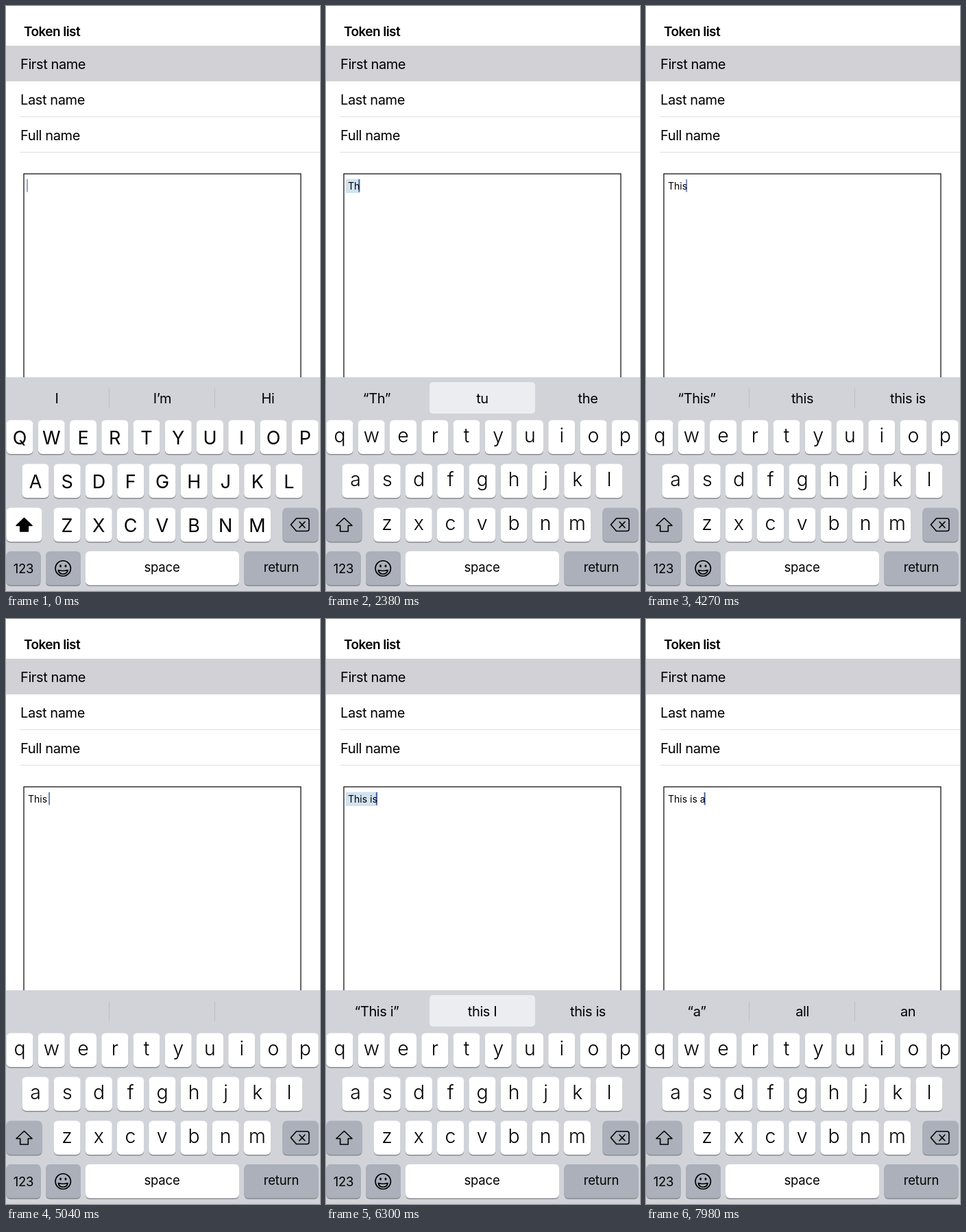
Recreate the animation shown at these times as an HTML page. Size 458 px wide and 854 px high, loop 8000 ms.

```html
<!DOCTYPE html>
<html lang="en">
<head>
<meta charset="utf-8">
<title>Token list</title>
<style>
html, body { margin: 0; width: 100%; height: 100%; overflow: hidden; background: #fff; }
svg { display: block; width: 458px; height: 854px; font-family: Inter, Roboto, "Liberation Sans", sans-serif; }
text { white-space: pre; }
.ui { font-size: 20px; letter-spacing: -.02em; }
.mid { text-anchor: middle; }
.small { font-size: 18.5px; letter-spacing: -.01em; }
.upper { font-size: 27px; }
.lower { font-size: 28.5px; font-weight: 300; }
</style>
</head>
<body>
<svg id="stage" viewBox="0 0 458 854">
  <defs>
    <linearGradient id="leaving">
      <stop id="leaveLeft" offset=".78"/>
      <stop id="leaveRight" offset=".9"/>
    </linearGradient>
    <filter id="soft" x="-30%" y="-20%" width="160%" height="140%">
      <feDropShadow dx="0" dy="1" stdDeviation="3" flood-color="#000" flood-opacity=".3"/>
    </filter>
  </defs>
</svg>
<script>
const LOOP = 8000;
const GRAY = '#abb0bb';
const ROWS = [['qwertyuiop', .5, 604.5], ['asdfghjkl', 23.5, 668.5], ['zxcvbnm', 69.5, 732.5]];
const PITCH = 46.25, KEY_W = 39, KEY_H = 49.5;

// [time, text in the box]
const TYPED = [[-660, ''], [1680, 'T'], [1960, 'Th'], [3010, 'Thi'], [3640, 'This'], [4430, 'This '],
  [5090, 'This i'], [6230, 'This is'], [6800, 'This is '], [7700, 'This is a']];

// [time, suggestions, correction pending]
const HINTS = [
  [-500, ['I', 'I’m', 'Hi']],
  [1780, ['“T”', 'the', 'this']],
  [2220, ['“Th”', 'tu', 'the'], true],
  [3140, ['“Thi”', 'tho', 'this'], true],
  [3860, ['“This”', 'this', 'this is']],
  [4480, ['', '', '']],
  [5300, ['“This i”', 'this I', 'this is'], true],
  [6400, ['“This is”', 'this is', 'this is a']],
  [6820, ['the', 'a', 'what']],
  [7790, ['“a”', 'all', 'an']]];

// [down, up, key]
const PRESSES = [[1530, 1680, 't'], [1815, 1960, 'h'], [2870, 3010, 'i'], [3500, 3640, 's'], [4300, 4570, ' '],
  [5045, 5095, 'i'], [6090, 6230, 's'], [6720, 6950, ' '], [7550, 7700, 'a']];

const svg = document.getElementById('stage');
const byId = id => document.getElementById(id);

function add(tag, attrs, parent = svg, content = '') {
  const el = document.createElementNS('http://www.w3.org/2000/svg', tag);
  for (const name in attrs) el.setAttribute(name, attrs[name]);
  el.textContent = content;
  parent.append(el);
  return el;
}
const set = (el, attrs) => { for (const name in attrs) el.setAttribute(name, attrs[name]); };
const show = (el, on) => el.setAttribute('visibility', on ? 'visible' : 'hidden');
const clamp = v => Math.max(0, Math.min(1, v));
const rect = (x, y, width, height, fill, rx = 0) => add('rect', { x, y, width, height, fill, rx });
const label = (x, y, cls, content) => add('text', { x, y, class: cls }, svg, content);

function key(x, y, width, fill = '#fff') {
  rect(x, y + 1.5, width, KEY_H, '#898b90', 6);
  return rect(x, y, width, KEY_H, fill, 6);
}
const line = (d, extra) => add('path', { d, fill: 'none', stroke: '#000', 'stroke-width': 1.6,
  'stroke-linejoin': 'round', 'stroke-linecap': 'round', ...extra });

// Token list
set(label(26, 44, 'ui', 'Token list'), { 'font-weight': 600, style: 'font-size:19px;letter-spacing:-.03em' });
rect(0, 58, 458, 52, '#d1d1d6');
['First name', 'Last name', 'Full name'].forEach((name, i) => {
  label(21, 92 + 52 * i, 'ui', name);
  if (i) rect(21, 109 + 52 * i, 437, 1, '#dedee0');
});

// Text box
add('rect', { x: 26, y: 245, width: 404, height: 320, fill: '#fff', stroke: '#000', 'stroke-width': 1.2 });
const mark = rect(28.5, 252.5, 0, 20.5, '#d2e2ef');
const cursor = rect(30, 253, 2, 18.5, '#4660a8');
const typed = label(32, 267.5, '', '');
typed.style.fontSize = '14px';

// Suggestion bar
rect(0, 542, 458, 312, '#d1d3d9');
const dividers = [150, 304].map(x => rect(x, 558, 1, 29, '#bcbec4'));
const chosen = rect(151, 549, 154, 46, '#ebedf1', 5);
const slots = [74, 228, 382];
const oldHints = slots.map(x => label(x, 580, 'ui mid', ''));
const newHints = slots.map(x => label(x, 580, 'ui mid', ''));
oldHints.forEach(el => el.setAttribute('fill', 'url(#leaving)'));

// Keyboard
const keys = {};
const letters = [];
ROWS.forEach(([chars, left, y]) => [...chars].forEach((char, i) => {
  const x = left + PITCH * i;
  key(x, y, KEY_W);
  keys[char] = { cx: x + KEY_W / 2, y };
  letters.push({ el: label(x + KEY_W / 2, y, 'mid', ''), char, y });
}));
const shiftKey = key(.5, 732.5, 52);
const shiftIcon = line('M26.5 747.5 L38 758.5 H32.3 V767 H20.7 V758.5 H15 Z');
key(403.5, 732.5, 52, GRAY);
line('M423.5 748 H439 Q442 748 442 751 V763.5 Q442 766.5 439 766.5 H423.5 L415.5 757.2 Z M428 753 l8 8.5 m0 -8.5 l-8 8.5');
key(.5, 796, 50, GRAY);
key(58, 796, 51, GRAY);
const spaceKey = key(116, 796, 224);
key(347.5, 796, 108, GRAY);
label(25.5, 828, 'mid small', '123');
label(227.5, 826, 'mid small', 'space');
label(401.5, 826, 'mid small', 'return');
line('M72 821 a11.2 11.2 0 1 0 22.4 0 a11.2 11.2 0 1 0 -22.4 0 M76.2 823.5 Q83.2 825.5 90.2 823.5 Q89 829.2 83.2 829.2 Q77.4 829.2 76.2 823.5 Z');
[79.5, 87].forEach(cx => add('ellipse', { cx, cy: 817.5, rx: 1.4, ry: 2 }));

// Enlarged key, drawn around the top centre of the pressed one
const popup = add('g', {});
add('path', { fill: '#fff', filter: 'url(#soft)',
  d: 'M-23 -76.5 H23 Q35 -76.5 35 -64.5 V-24 C35 -8 19.5 -9 19.5 8 V43.5 Q19.5 49.5 13.5 49.5 H-13.5 Q-19.5 49.5 -19.5 43.5 V8 C-19.5 -9 -35 -8 -35 -24 V-64.5 Q-35 -76.5 -23 -76.5 Z' }, popup);
const popupLetter = add('text', { y: -28, class: 'mid', 'font-size': 41, 'font-weight': 300 }, popup);

// Hold, fade out, rest, fade in
function cursorAlpha(age) {
  const a = age % 1150;
  if (a < 560) return 1;
  if (a < 800) return 1 - (a - 560) / 240;
  return clamp((a - 940) / 210);
}
const indexAt = (list, t) => list.findLastIndex(item => item[0] <= t);

function draw(t) {
  const upper = t < 1690;
  const [since, text] = TYPED[indexAt(TYPED, t)];
  typed.textContent = text;
  const end = 30 + (text ? typed.getComputedTextLength() : 0);
  set(cursor, { x: end, opacity: cursorAlpha(t - since) });

  const h = indexAt(HINTS, t);
  const [from, words, pending] = HINTS[h];
  const p = clamp((t - from) / 140);
  show(mark, pending);
  mark.setAttribute('width', Math.max(0, end - 26));
  show(chosen, pending);
  dividers.forEach(el => show(el, !pending));
  slots.forEach((_, i) => {
    newHints[i].textContent = words[i];
    newHints[i].setAttribute('opacity', clamp(p * 4));
    oldHints[i].textContent = h && p < 1 ? HINTS[h - 1][1][i] : '';
  });
  byId('leaveLeft').setAttribute('stop-opacity', clamp(2 * (1 - p)));
  byId('leaveRight').setAttribute('stop-opacity', (1 - p) ** 1.4);

  letters.forEach(({ el, char, y }) => {
    el.textContent = upper ? char.toUpperCase() : char;
    set(el, { y: y + (upper ? 35.5 : 32.3), class: 'mid ' + (upper ? 'upper' : 'lower') });
  });
  shiftKey.setAttribute('fill', upper ? '#fff' : GRAY);
  shiftIcon.setAttribute('fill', upper ? '#000' : 'none');

  const press = PRESSES.find(([down, up]) => t >= down && t < up);
  const pressed = press ? press[2] : '';
  const spot = keys[pressed];
  spaceKey.setAttribute('fill', pressed === ' ' ? GRAY : '#fff');
  show(popup, spot);
  if (spot) {
    popup.setAttribute('transform', `translate(${spot.cx} ${spot.y})`);
    popupLetter.textContent = upper ? pressed.toUpperCase() : pressed;
  }
}

const start = performance.now();
function tick() {
  draw((performance.now() - start) % LOOP);
  requestAnimationFrame(tick);
}
tick();
</script>
</body>
</html>
```
